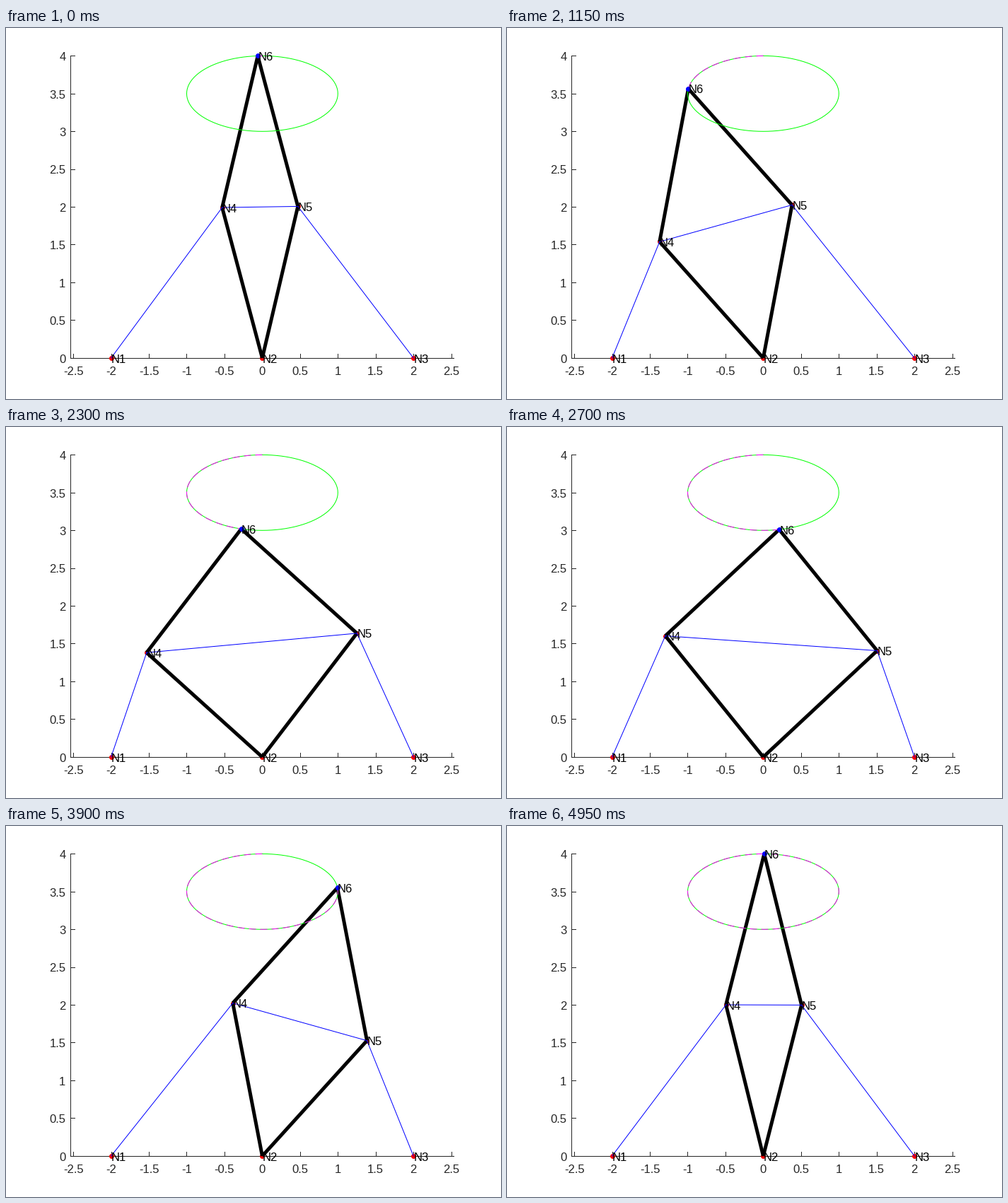
Animation of 700x525 px, one loop 5000 ms. Source, as a matplotlib script:

```python
import numpy as np
import matplotlib.pyplot as plt
from matplotlib.animation import FuncAnimation

W, H, DPI = 700, 525, 100
PT = 72 / DPI                      # points per pixel
FRAMES, INTERVAL = 100, 50
X0, Y0, UNIT = 362.4, 467, 106.9   # pixel place of the origin, pixels per unit
LEFT, RIGHT, TOP, BOTTOM = 91.2, 633, 39.4, 466.8
AXIS = "#262626"
ARM = np.sqrt(4.25)                # length of each rhombus side

plt.rcParams["font.family"] = "Liberation Sans"
plt.rcParams["font.size"] = 16.67 * PT

fig = plt.figure(figsize=(W / DPI, H / DPI), dpi=DPI, facecolor="white")
ax = fig.add_axes([0, 0, 1, 1])
ax.set(xlim=(0, W), ylim=(H, 0))
ax.axis("off")


def to_px(points):
    p = np.asarray(points, float)
    return X0 + UNIT * p[..., 0], Y0 - UNIT * p[..., 1]


def line(x, y, color, width=1, z=1, **style):
    return ax.plot(x, y, color=color, lw=width * PT, zorder=z, **style)[0]


def dots(color, z):
    return ax.plot([], [], "o", color=color, ms=7 * PT, mew=0, zorder=z)[0]


def ellipse(turn):
    a = 2 * np.pi * np.asarray(turn)
    return np.stack([-np.sin(a), 3.5 + 0.5 * np.cos(a)], axis=-1)


def turn_at(i):
    """Share of the ellipse covered; the last pose closes the curve."""
    if i == FRAMES - 1:
        return 0.998
    return np.interp(i, [0, 23, 63, 78, 98],
                     [0.0095, 0.2292, 0.6222, 0.7665, 0.9605])


def joints(tip):
    """The two middle corners of the rhombus between the origin and the tip."""
    reach = np.hypot(*tip)
    side = np.array([-tip[1], tip[0]]) / reach
    bulge = side * np.sqrt(ARM ** 2 - reach ** 2 / 4)
    return tip / 2 + bulge, tip / 2 - bulge


def draw_axes():
    line([LEFT, RIGHT], [BOTTOM, BOTTOM], AXIS)
    line([LEFT, LEFT], [TOP, BOTTOM], AXIS)
    for v in np.arange(-2.5, 2.6, 0.5):
        x = X0 + UNIT * v
        line([x, x], [BOTTOM - 5.5, BOTTOM], AXIS)
        ax.text(x, 491, f"{v:g}", color=AXIS, ha="center", va="baseline")
    for v in np.arange(0, 4.1, 0.5):
        y = BOTTOM - UNIT * v
        line([LEFT, LEFT + 5.5], [y, y], AXIS)
        ax.text(84.5, y + 6.9, f"{v:g}", color=AXIS, ha="right", va="baseline")


draw_axes()
red = dots("red", 2)
bars = [line([], [], "black", 5, 3, solid_capstyle="butt") for _ in range(4)]
rods = [line([], [], "blue", 1, 4) for _ in range(3)]
line(*to_px(ellipse(np.linspace(0, 1, 201))), "lime", 1, 5)
trace = line([], [], "magenta", 1, 6, dashes=(10, 6), dash_capstyle="butt")
tip_dot = dots("blue", 7)
labels = [ax.text(0, 0, f"N{n}", color="black", va="baseline", zorder=8)
          for n in range(1, 7)]


def update(i):
    turn = turn_at(i)
    tip = ellipse(turn)
    n4, n5 = joints(tip)
    nodes = np.array([(-2, 0), (0, 0), (2, 0), n4, n5, tip])

    red.set_data(*to_px(nodes[:5]))
    tip_dot.set_data(*to_px(nodes[5:]))
    for bar, ends in zip(bars, [(1, 3), (1, 4), (3, 5), (4, 5)]):
        bar.set_data(*to_px(nodes[list(ends)]))
    for rod, ends in zip(rods, [(0, 3), (3, 4), (4, 2)]):
        rod.set_data(*to_px(nodes[list(ends)]))
    trace.set_data(*to_px(ellipse(np.linspace(0, turn, 2 + 2 * i))))
    for label, x, y in zip(labels, *to_px(nodes)):
        label.set_position((x + 0.3, y + 6.5))
    return [red, *bars, *rods, trace, tip_dot, *labels]


anim = FuncAnimation(fig, update, frames=FRAMES, interval=INTERVAL,
                     repeat=True, repeat_delay=0)
plt.show()
```
